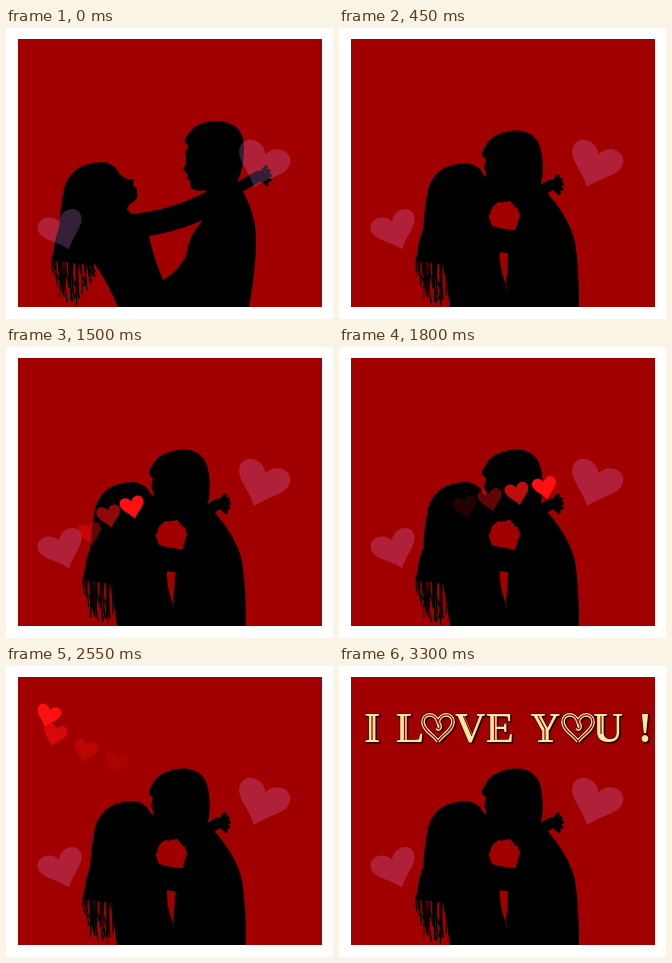
An HTML page for the animation above (5300 ms loop, 327 by 291 pixels).

```html
<!DOCTYPE html>
<html lang="en">
<head>
<meta charset="utf-8">
<title>I love you</title>
<style>
  html, body { margin: 0; width: 100%; height: 100%; overflow: hidden; background: #fff; }
  svg { display: block; width: 100vw; height: 100vh; }
  text { font: bold 42px "Liberation Serif", "Noto Serif", serif; }
  .line { fill: none; stroke: #000; stroke-linecap: round; }
  #letters { fill: #ffe9a0; stroke: #2c0000; stroke-width: 1.2; paint-order: stroke; filter: drop-shadow(1px 1px 0 #2c0000); }
  #letters path, #letters use { fill: none; }
  #letters .edge { stroke: #2c0000; stroke-width: 5; }
  #letters .gold { stroke: #ffe9a0; stroke-width: 3.8; }
  #letters .groove { stroke: #a00000; stroke-width: 1.3; }
</style>
</head>
<body>
<svg viewBox="0 0 327 291" role="img" aria-label="I LOVE YOU !">
  <defs>
    <path id="heart" d="M0 11.5C-4 5-12 1-12-5C-12-12-3-13 0-6C3-13 12-12 12-5C12 1 4 5 0 11.5Z"/>
    <path id="letterHeart" d="M0 13.5C-4 7-15 2-15-6C-15-15-3-16 0-6C3-16 15-15 15-6C15 2 4 7 0 13.5M0-6C4-1 1 3-1 0"/>
    <g id="letterHearts"><use href="#letterHeart" x="99" y="62"/><use href="#letterHeart" x="239" y="62"/></g>
    <clipPath id="frame"><rect x="12" y="11" width="304" height="268"/></clipPath>
    <linearGradient id="fade" gradientUnits="userSpaceOnUse">
      <stop offset="0" stop-color="#fff"/>
      <stop offset=".15" stop-color="#fff" stop-opacity=".55"/>
      <stop offset=".28" stop-color="#fff" stop-opacity=".3"/>
      <stop offset=".42" stop-color="#fff" stop-opacity=".08"/>
      <stop offset="1" stop-color="#fff" stop-opacity=".04"/>
    </linearGradient>
    <mask id="reveal" maskUnits="userSpaceOnUse" x="0" y="0" width="327" height="291">
      <rect width="327" height="291" fill="url(#fade)"/>
    </mask>
  </defs>
  <rect width="327" height="291" fill="#fff"/>
  <g clip-path="url(#frame)">
    <rect x="12" y="11" width="304" height="268" fill="#a00000"/>
    <path id="manBody"/>
    <path id="manHead" d="M205 170L200 162Q190 164 185 160L184 153L181 150L182 147L177 141Q182 134 179 126L182 117Q175 113 183 105Q190 93 213 93Q238 95 238 120Q238 140 232 152L236 170Z"/>
    <path id="womanBody"/>
    <path id="arm" class="line" stroke-width="24"/>
    <g id="hand">
      <path class="line" stroke-width="11" d="M225 164L253 148"/>
      <path id="fingers" class="line" stroke-width="4"/>
    </g>
    <g id="womanHead">
      <path d="M120 186Q121 177 127 174Q133 170 131 165L131 161L127 157L128 151L122 151Q114 149 110 140Q104 135 97 134Q66 134 58 160Q54 180 53 200Q47 215 47 232L88 238L95 190Z"/>
      <path id="strands" class="line" stroke-width="1.4"/>
    </g>
    <g fill="#e791ff" fill-opacity=".22">
      <use href="#heart" transform="translate(255.5 137.5) rotate(19) scale(2.2 1.98)"/>
      <use href="#heart" transform="translate(56.5 203) rotate(-20) scale(1.9 1.68)"/>
    </g>
    <g id="trail" fill="#ff1010"></g>
    <g id="message" mask="url(#reveal)">
      <g id="letters">
        <use class="edge" href="#letterHearts"/>
        <use class="gold" href="#letterHearts"/>
        <use class="groove" href="#letterHearts"/>
        <text x="25" y="76">I</text>
        <text x="57" y="76">L</text>
        <text x="116" y="76">V</text>
        <text x="147" y="76">E</text>
        <text x="191" y="76">Y</text>
        <text x="254" y="76">U</text>
        <text x="299" y="76">!</text>
        <path class="groove" d="M33 50V74M65.500 50V74M124.500 50L133 70M155.500 50V74M199 50L206 63V74M262 50V68"/>
      </g>
    </g>
  </g>
</svg>
<script>
const STEP = 150, LOOP = 5300, LAST_STEP = 22, TEXT_STEP = 18;
const $ = id => document.getElementById(id);
const set = (id, name, value) => $(id).setAttribute(name, value);
const lerp = (a, b, k) => a + (b - a) * k;

// Blends two paths that share the same commands.
function blend(from, to, k) {
  const goal = to.match(/\d+/g);
  let i = 0;
  return from.replace(/\d+/g, n => lerp(+n, +goal[i++], k));
}

// Soft parts bend from apart to kissing; heads and hand only move.
const bends = {
  manBody: [
    'M200 160L196 193Q181 210 180 228Q172 243 157 252L160 279L243 279Q250 240 250 212Q250 185 234 158Z',
    'M175 170L181 187Q177 200 169 225Q169 240 167 254L170 279L240 279Q240 240 236 214Q230 188 204 160Z'],
  womanBody: [
    'M80 185L122 182L143 208Q147 228 157 252L165 279L112 279Q102 255 88 235Z',
    'M100 190L148 184L161 220Q160 240 166 254L172 279L111 279Q108 262 106 235Z'],
  arm: ['M118 198Q165 197 210 172', 'M130 202Q160 216 190 214']
};

// Each heart trail follows u from 0 to 1; `born` gives the steps after `start`.
const trails = [
  { count: 6, start: 4, end: 8, tilt: -10, born: i => Math.ceil(i / 2),
    at: u => [111 + 129 * u ** .93, 267 - 36 * u * u] },
  { count: 6, start: 9, end: 14, tilt: -12, born: i => Math.floor(i * .75),
    at: u => [84 + 122 * u ** 1.15, 187 - 46 * u ** .6] },
  { count: 5, start: 15, end: 18, tilt: 16, born: i => Math.floor(i * i / 8),
    at: u => [Math.max(42, 140 - 122 * u), 104 - 54 * u ** 1.5] }
];

function seeded(seed) {
  return () => (seed = seed * 16807 % 2147483647) / 2147483647;
}

function buildHair() {
  const random = seeded(77), count = 28;
  let d = '';
  for (let i = 0; i < count; i++) {
    const u = i / count;
    const length = 14 + 42 * Math.sin(Math.PI * (.15 + .85 * u)) * lerp(.45, 1, random());
    d += `M${48 + 41 * u} 224q${lerp(-5, 3, random())} ${length / 2} ${lerp(-1, 5, random())} ${length}`;
  }
  set('strands', 'd', d);
}

function buildFingers() {
  let d = '';
  for (let angle = -.9; angle < .9; angle += .42) {
    d += `M253 148l${11 * Math.cos(angle)} ${11 * Math.sin(angle)}`;
  }
  set('fingers', 'd', d);
}

function buildTrail(trail) {
  trail.hearts = Array.from({ length: trail.count }, (_, i) => {
    const node = document.createElementNS('http://www.w3.org/2000/svg', 'use');
    const [x, y] = trail.at(i / (trail.count - 1));
    node.setAttribute('href', '#heart');
    node.setAttribute('transform', `translate(${x} ${y}) rotate(${trail.tilt})`);
    $('trail').append(node);
    return { node, born: trail.start + trail.born(i) };
  });
}

// Hearts fade the further they lie behind the newest one.
function drawTrail({ hearts, end }, step) {
  const newest = hearts.filter(h => h.born <= step).length - 1;
  hearts.forEach(({ node, born }, i) => {
    const visible = born <= step && step < end;
    const strength = Math.max(0, 1 - .25 * (newest - i)) * .75 ** (step - born);
    node.setAttribute('opacity', visible ? strength : 0);
  });
}

function drawCouple(k) {
  for (const id in bends) set(id, 'd', blend(...bends[id], k));
  set('womanHead', 'transform', `translate(${31 * k} ${k})`);
  set('manHead', 'transform', `translate(${-35 * k} ${10 * k}) rotate(${-8 * k} 208 120)`);
  set('hand', 'transform', `translate(${-41 * k} ${9 * k})`);
}

function drawMessage(step) {
  const edge = 25 + 72 * (step - TEXT_STEP);
  $('message').style.display = step < TEXT_STEP ? 'none' : '';
  set('fade', 'x1', edge);
  set('fade', 'x2', edge + 230);
}

function draw(time) {
  const step = Math.min(LAST_STEP, Math.floor(time % LOOP / STEP));
  drawCouple(Math.min(1, step / 3));
  trails.forEach(trail => drawTrail(trail, step));
  drawMessage(step);
}

buildHair();
buildFingers();
trails.forEach(buildTrail);
const start = performance.now();
function tick() {
  draw(performance.now() - start);
  requestAnimationFrame(tick);
}
tick();
</script>
</body>
</html>
```
